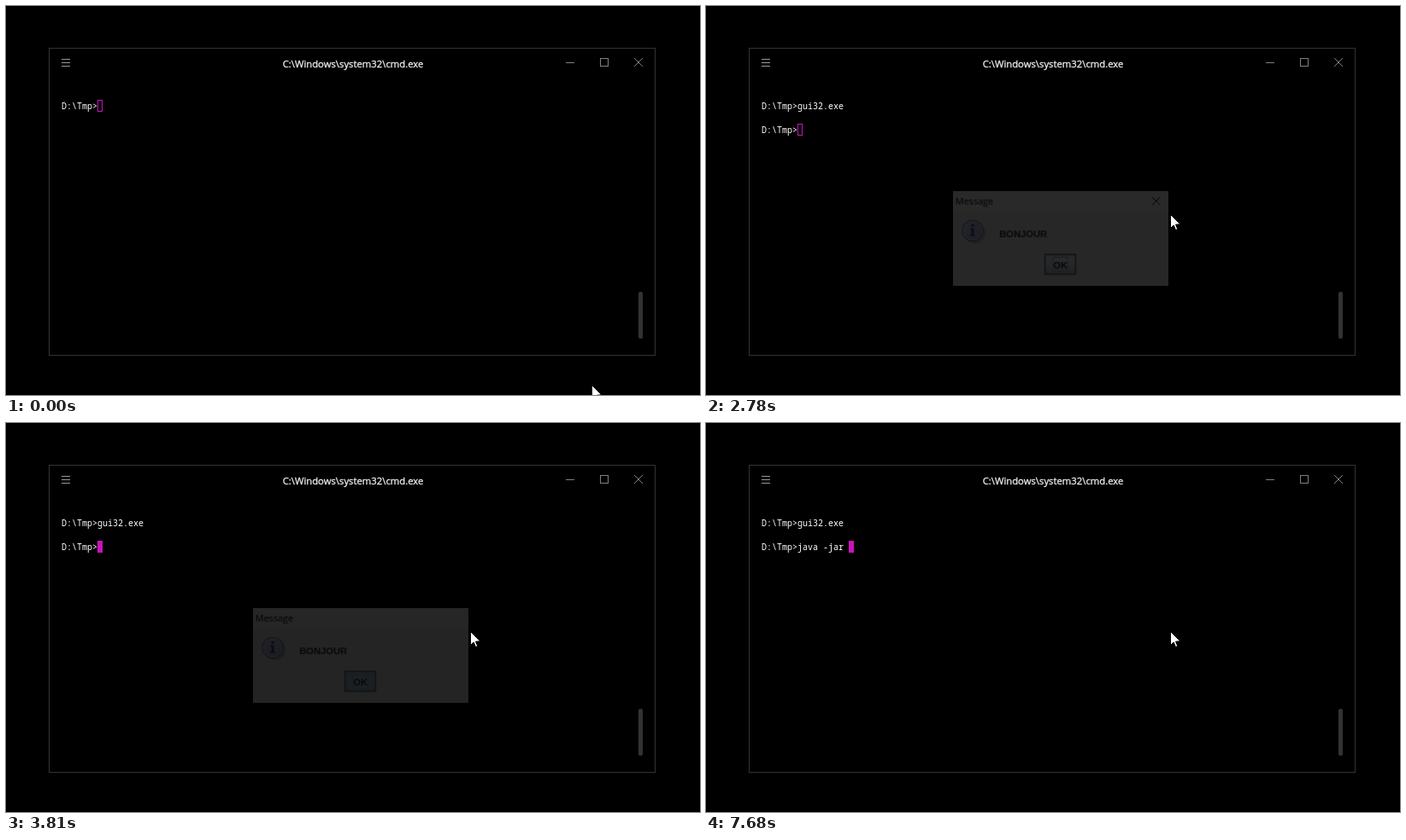
These frames come from a looping animation (812x456 px, 8 s). An HTML page with a canvas:

```html
<!DOCTYPE html>
<html lang="en">
<head>
<meta charset="utf-8">
<title>Terminal</title>
<style>
html, body { margin: 0; width: 100%; height: 100%; overflow: hidden; background: #000; }
canvas { display: block; }
</style>
</head>
<body>
<canvas id="stage" width="812" height="456"></canvas>
<script>
const LOOP = 8000;
const UI = '11.3px "Open Sans", sans-serif';
const MONO = '10px "Noto Sans Mono", monospace';
const BOLD = 'bold 11.6px "Liberation Sans", sans-serif';
const CELL = 6;
const PROMPT = 'D:\\Tmp>';

const ctx = document.getElementById('stage').getContext('2d');

// Each entry: [start time, value]; a value holds until the next entry.
const firstCommand = [[0, ''], [1410, 'g'], [1640, 'gu'], [1720, 'gui'], [1950, 'gui32.exe']];
const secondCommand = [[0, ''], [4610, 'j'], [4740, 'jav'], [4920, 'java'], [5470, 'java '],
  [6150, 'java -'], [7100, 'java -j'], [7180, 'java -ja'], [7490, 'java -jar'], [7680, 'java -jar ']];
const focused = [[0, false], [300, true], [2780, false], [3730, true]];
const pointerTravel = [[0, 0], [70, 0.2], [150, 0.6], [220, 0.93], [300, 1]];
const dialogFade = [[0, 0], [2780, 0.16], [2860, 0.66], [2940, 0.93], [3020, 1],
  [3730, 0.6], [3810, 0.15], [3880, 0]];
const dialogScale = [[0, 1], [2780, 0.963], [2860, 0.985], [2940, 0.996], [3020, 1],
  [3730, 0.982], [3810, 0.963]];

function at(track, t) {
  let value = track[0][1];
  for (const [start, next] of track) if (t >= start) value = next;
  return value;
}

function line(c, ...p) {
  c.beginPath();
  for (let i = 0; i < p.length; i += 4) {
    c.moveTo(p[i], p[i + 1]);
    c.lineTo(p[i + 2], p[i + 3]);
  }
  c.stroke();
}

function label(c, text, x, y, font, color) {
  c.font = font;
  c.fillStyle = color;
  c.fillText(text, x, y);
}

function drawWindow() {
  ctx.fillStyle = '#000';
  ctx.fillRect(0, 0, 812, 456);
  ctx.lineWidth = 1;
  ctx.strokeStyle = '#333';
  ctx.strokeRect(50.5, 49.5, 709, 360);

  ctx.strokeStyle = '#999';
  line(ctx, 65, 62.5, 75, 62.5, 65, 66.5, 75, 66.5, 65, 70.5, 75, 70.5);
  ctx.strokeStyle = '#808080';
  line(ctx, 655, 66.5, 665, 66.5);
  ctx.strokeRect(695.5, 61.5, 9, 9);
  line(ctx, 735, 61, 745, 71, 745, 61, 735, 71);

  ctx.textAlign = 'center';
  label(ctx, 'C:\\Windows\\system32\\cmd.exe', 406, 72, UI, '#f0f0f0');
  ctx.lineWidth = 0.3;
  ctx.strokeStyle = '#f0f0f0';
  ctx.strokeText('C:\\Windows\\system32\\cmd.exe', 406, 72);
  ctx.textAlign = 'left';

  ctx.fillStyle = '#333';
  ctx.beginPath();
  ctx.roundRect(740, 335, 5, 55, 2);
  ctx.fill();
}

function drawLine(text, top, hasCursor, solid) {
  [...text].forEach((ch, i) => label(ctx, ch, 65 + i * CELL, top + 11, MONO, '#fff'));
  if (!hasCursor) return;
  const x = 65 + text.length * CELL;
  ctx.fillStyle = ctx.strokeStyle = '#c814b8';
  ctx.lineWidth = 1;
  if (solid) ctx.fillRect(x, top, CELL, 14);
  else ctx.strokeRect(x + 0.5, top + 0.5, CELL - 1, 13);
}

function drawInfoIcon(c, x, y) {
  const disc = (dx, dy, r, fill) => {
    c.fillStyle = fill;
    c.beginPath();
    c.arc(x + dx, y + dy, r, 0, Math.PI * 2);
    c.fill();
  };
  disc(2.5, 2.5, 13, '#c4c4c8');
  disc(0, 0, 13, '#666699');
  disc(0, 0, 12, '#f0f0ff');
  const shade = c.createLinearGradient(x - 8, y - 8, x + 8, y + 8);
  shade.addColorStop(0, '#d4d4ff');
  shade.addColorStop(1, '#b8b8f4');
  disc(0, 0, 11, shade);
  c.fillStyle = '#505080';
  c.fillRect(x - 1.5, y - 8, 3, 3);
  c.fillRect(x - 3, y - 3, 4.5, 1.5);
  c.fillRect(x - 1.5, y - 3, 3, 9);
  c.fillRect(x - 3, y + 5, 6, 1.5);
}

function makeDialog(pressed, closeMark) {
  const canvas = document.createElement('canvas');
  canvas.width = 262;
  canvas.height = 115;
  const c = canvas.getContext('2d');
  c.fillStyle = '#eee';
  c.fillRect(0, 0, 262, 115);
  c.fillStyle = '#fff';
  c.fillRect(0, 0, 262, 25);
  label(c, 'Message', 3, 16, UI, '#000');
  if (closeMark) {
    c.strokeStyle = '#111';
    line(c, 242, 7, 252, 17, 252, 7, 242, 17);
  }

  drawInfoIcon(c, 24, 48);
  label(c, 'BONJOUR', 56.5, 56, BOLD, '#333');

  const face = c.createLinearGradient(0, 76, 0, 102);
  face.addColorStop(0, '#dde8f3');
  face.addColorStop(0.3, '#fff');
  face.addColorStop(0.6, '#dde8f3');
  face.addColorStop(1, '#b8cfe5');
  c.fillStyle = pressed ? '#b8cfe5' : face;
  c.fillRect(111, 76, 39, 26);
  c.strokeStyle = '#7a8a99';
  c.lineWidth = 2;
  c.strokeRect(112, 77, 37, 24);
  c.strokeStyle = '#a3b8cc';
  c.lineWidth = 1;
  c.strokeRect(121.5, 80.5, 18, 17);
  label(c, 'OK', 122, 94, BOLD, '#333');
  return canvas;
}

function drawDialog(t) {
  const fade = at(dialogFade, t);
  if (!fade) return;
  const scale = at(dialogScale, t);
  const w = 262 * scale, h = 115 * scale;
  const image = t < 3650 ? dialogs.idle : t < 3730 ? dialogs.pressed : dialogs.closing;
  const shrink = (1 - scale) / 0.037;
  ctx.globalAlpha = fade;
  ctx.drawImage(image, 416 - shrink - w / 2, 273.5 - shrink - h / 2, w, h);
  ctx.globalAlpha = 1;
}

function drawPointer(t) {
  const k = at(pointerTravel, t);
  ctx.save();
  ctx.translate(Math.round(685 - 142 * k), Math.round(444 - 200 * k));
  ctx.fill(arrow);
  ctx.fillStyle = '#fff';
  ctx.strokeStyle = '#000';
  ctx.lineWidth = 1;
  ctx.fill(arrow);
  ctx.stroke(arrow);
  ctx.restore();
}

const arrow = new Path2D('M.5 .5V16.5L4.2 13L6.5 18.5L8.8 17.6L6.5 12.2L11.8 11.8Z');
const dialogs = {
  idle: makeDialog(false, true),
  pressed: makeDialog(true, true),
  closing: makeDialog(true, false)
};

function render(t) {
  const solid = at(focused, t);
  const launched = t >= 2350;
  drawWindow();
  drawLine(PROMPT + at(firstCommand, t), 110, !launched, solid);
  if (launched) drawLine(PROMPT + at(secondCommand, t), 138, true, solid);
  drawDialog(t);
  drawPointer(t);
}

const begin = performance.now();
function tick() {
  render((performance.now() - begin) % LOOP);
  requestAnimationFrame(tick);
}
tick();
</script>
</body>
</html>
```
